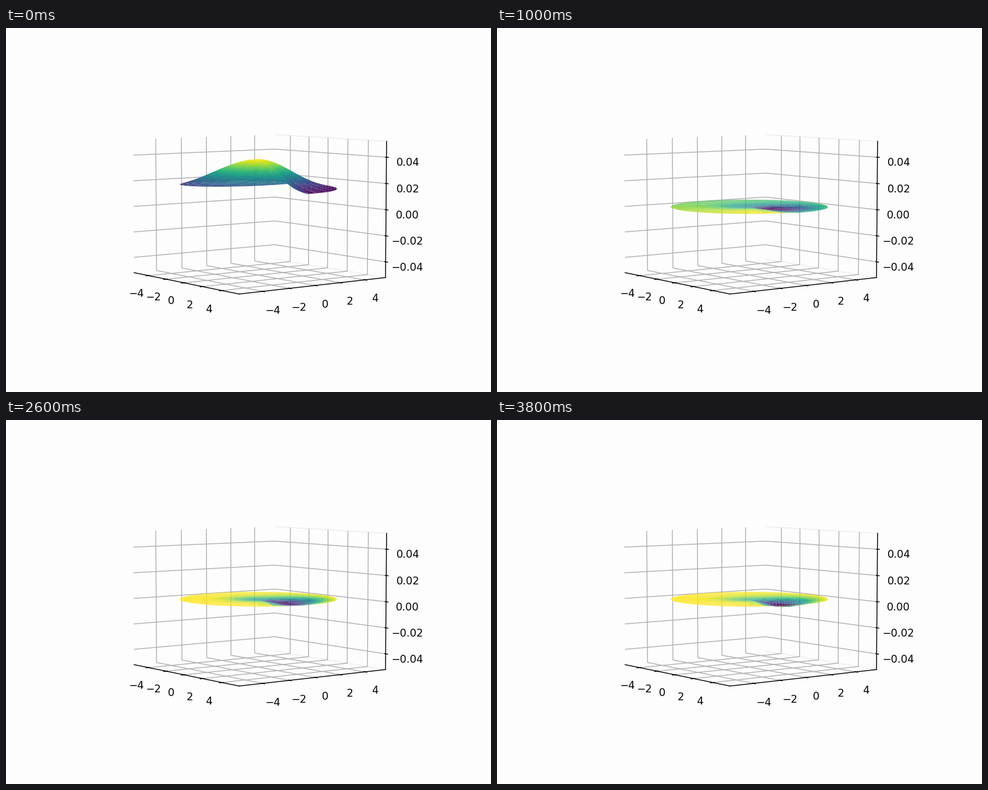
A matplotlib script for the animation above (4 s loop, 800x600 px).

```python
import numpy as np
import matplotlib.pyplot as plt
from matplotlib.animation import FuncAnimation

FRAMES = 20
PAPER = "#fdfdfd"
UNIT = 1 / 2131  # one screen pixel of height in z units

fig = plt.figure(figsize=(6.4, 4.8), dpi=125, facecolor=PAPER)
ax = fig.add_subplot(projection="3d")
ax.set_facecolor(PAPER)
ax.view_init(elev=5.4, azim=-37)

for axis in (ax.xaxis, ax.zaxis):
    axis.pane.set_visible(False)
ax.yaxis.set_pane_color((0.94, 0.94, 0.94, 1))
ax.yaxis.pane.set_fill(False)

theta, r = np.meshgrid(np.linspace(0, 2 * np.pi, 30), np.linspace(0, 5, 30))
X, Y = r * np.cos(theta), r * np.sin(theta)
rho = r / 5
turn = theta / (2 * np.pi)
turn[:, -1] = 0  # the seam closes onto the first ray
phi = np.degrees((theta + np.pi) % (2 * np.pi) - np.pi)
phi[:, -1] = 0


def bell(x, width):
    return np.exp(-(x / width) ** 2)


def hill(n):
    """Cooling dome: a sinking rim plus a narrowing central peak."""
    edge = 30 * 0.385 ** n + 19 * turn ** 2.2 * 0.55 ** n
    centre = 30 * 0.385 ** n + 4 * 0.55 ** n + 44 * np.exp(-(n / 2.95) ** 3)
    width = (0.54 + 0.4 * turn) * 0.77 ** n
    rim = bell(1, width)
    shape = (bell(rho, width) - rim) / (1 - rim)
    return edge + (centre - edge) * shape


def dip(n):
    """Hollow that opens beside the seam and slowly deepens."""
    grow = max(0, (n - 7) / 12)
    fan = bell(phi - 8, np.where(phi < 8, 20, 75))
    slot = bell(phi + 6, np.where(phi < -6, 13, 16))
    bowl = 1.7 * bell(rho, 0.42) * (1 - rho)
    wide = (2.3 + grow) * np.sin(np.pi * rho ** 0.9) * fan
    deep = (0.2 + 3.6 * grow) * np.sin(np.pi * rho ** 2.2) * slot
    return (1 - np.exp(-(n / 5) ** 3)) * (bowl + wide + deep)


surface = None


def draw(n):
    global surface
    if surface is not None:
        surface.remove()
    Z = (2 + hill(n) - dip(n)) * UNIT
    surface = ax.plot_surface(X, Y, Z, cmap="viridis", rstride=1, cstride=1)
    side, height = 5.5 * 25 / 24, 0.05 * 25 / 24
    ax.set_xlim(-side, side)
    ax.set_ylim(-side, side)
    ax.set_zlim(-height, height)
    return [surface]


ax.set_xticks(range(-4, 5, 2))
ax.set_yticks(range(-4, 5, 2))
ax.set_zticks([-0.04, -0.02, 0, 0.02, 0.04])

anim = FuncAnimation(fig, draw, frames=FRAMES, interval=200,
                     init_func=lambda: draw(0), repeat=True, repeat_delay=0)
plt.show()
```
